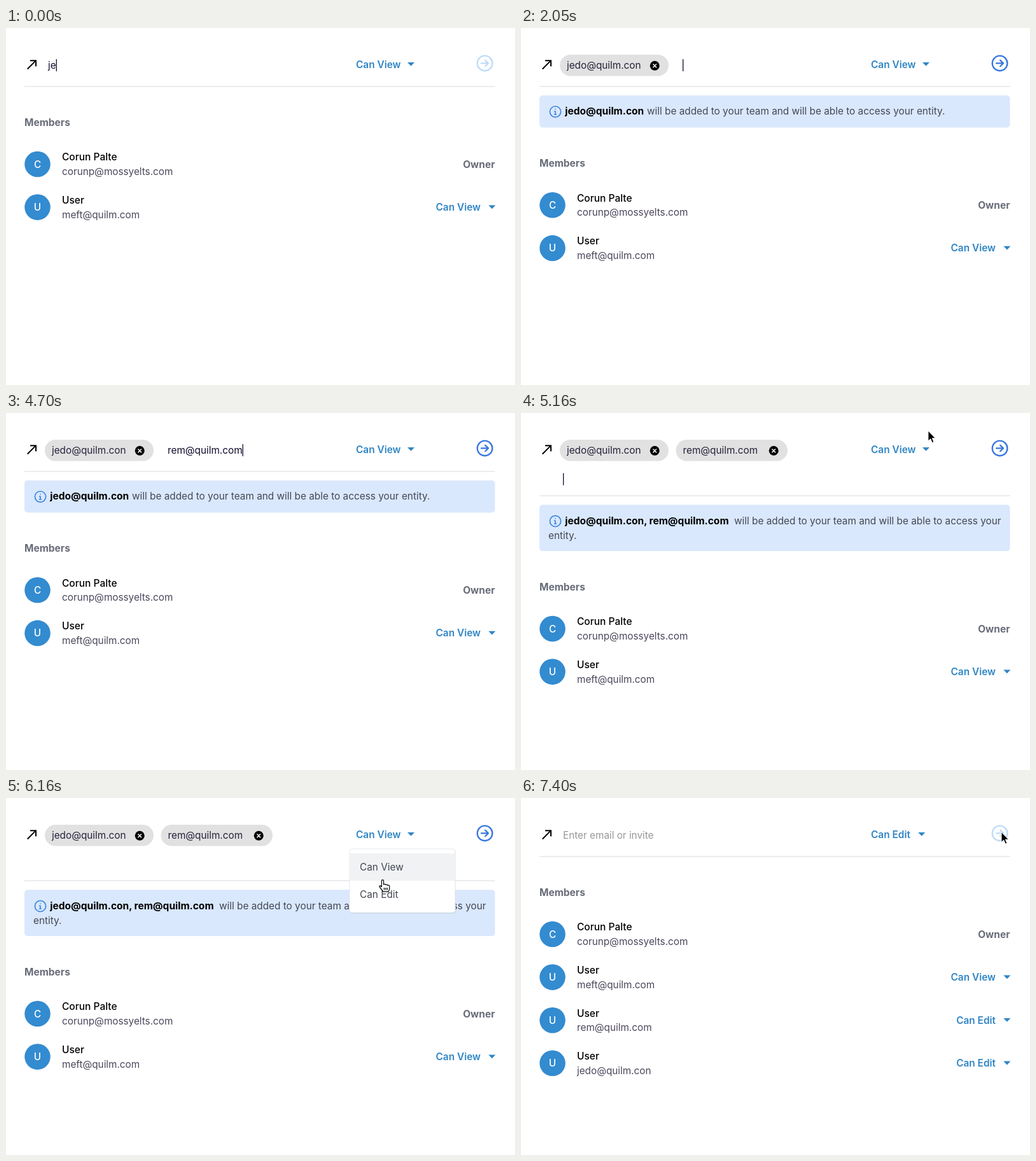
These frames come from a looping animation (800x561 px, 8000 ms). An HTML page:

```html
<!DOCTYPE html>
<html lang="en">
<head>
<meta charset="utf-8">
<title>Invite members</title>
<style>
  html, body { margin: 0; width: 100%; height: 100%; overflow: hidden; background: #fff; }
  svg { display: block; width: 800px; height: 561px; font: 15.3px Inter, sans-serif; }
  text { white-space: pre; }
  .input { fill: #110c2c; }
  .hint { fill: #97979b; }
  .chip { fill: #262138; }
  .name { font-size: 15.5px; font-weight: 500; fill: #000; }
  .mail { fill: #4c465c; }
  .head { font-size: 15.5px; font-weight: 700; fill: #686c79; }
  .role { font-size: 15.4px; font-weight: 600; fill: #2f85c5; }
  .note { font-size: 15.35px; fill: #434753; }
  .added { font-size: 15.5px; font-weight: 700; fill: #000; }
  .initial { font-weight: 500; fill: #fff; text-anchor: middle; }
  .end { text-anchor: end; }
  .line { fill: none; stroke-linecap: round; stroke-linejoin: round; }
</style>
</head>
<body>
<svg viewBox="0 0 800 561">
  <g id="page"></g>
  <rect id="caret" width="1.3" height="19" fill="#110c2c"/>
  <g id="menu">
    <rect x="541" y="81" width="166" height="101" rx="4" fill="#000" opacity=".06"/>
    <rect x="540" y="80" width="166" height="100" rx="4" fill="#fff" stroke="#e5e7eb"/>
    <rect id="hover" x="541" width="164" height="43" fill="#f1f2f4"/>
    <text class="note" x="556" y="114">Can View</text>
    <text class="note" x="556" y="157">Can Edit</text>
  </g>
  <g id="cursor">
    <path id="arrow" fill="#000" stroke="#fff" d="M0 0V16L3.7 12.6 6.3 18.6 8.9 17.5 6.4 11.7H11.4Z"/>
    <path id="hand" fill="#fff" stroke="#000" stroke-width="1.2" stroke-linejoin="round"
      d="M-1.5 11V1.2a1.6 1.6 0 0 1 3.2 0V7q2.6-1.6 3.4 .5 2.4-1 3 .8 2.8-.7 2.8 1.6v3.2q0 2-1.5 5H.8Q-1 15-4.2 11.5q-1.6-2 .3-2.6 1.2 0 2.4 2.1M2.6 12v3.5m2.4-3.5v3.5m2.4-3.5v3.5"/>
  </g>
</svg>
<script>
const LOOP = 8000;
const FIRST = 'jedo@quilm.con', SECOND = 'rem@quilm.com';
const MEMBERS = [['Corun Palte', 'corunp@mossyelts.com', 'Owner'], ['User', 'meft@quilm.com', 'Can View']];
const INVITED = [SECOND, FIRST].map(mail => ['User', mail, 'Can Edit']);

// Moment at which each character appears
const KEYS = {
  [FIRST]: [0, 0, 100, 250, 450, 650, 1000, 1150, 1250, 1400, 1550, 1650, 1800, 1900],
  [SECOND]: [2600, 2800, 3000, 3200, 3650, 3750, 3850, 4000, 4100, 4200, 4300, 4450, 4550]
};
const CHIP1 = 2050, CHIP2 = 4900, OPEN = 5850, PICK = 6450, SENT = 7250;
// Pointer stops: time, x, y
const PATH = [[5150, 640, 28], [5700, 581, 61.5], [5900, 581, 61.5], [6300, 596, 155],
  [6620, 596, 155], [7050, 755, 53.5], [LOOP, 755, 53.5]];

const $ = id => document.getElementById(id);
const clamp = v => Math.min(1, Math.max(0, v));
const text = (x, y, str, cls) => `<text x="${x}" y="${y}" class="${cls}">${str}</text>`;
const line = (d, color, width) => `<path class="line" d="${d}" stroke="${color}" stroke-width="${width}"/>`;
const caretDown = (x, y) => `<path fill="#2f85c5" d="M${x} ${y}h11l-5.5 5.8z"/>`;
const typed = (str, t) => str.slice(0, KEYS[str].filter(k => k <= t).length);

function chip(x, w, mail) {
  const cx = x + w - 21.8;
  return `<rect x="${x}" y="42" width="${w}" height="33.5" rx="16.75" fill="#e1e1e2"/>` +
    text(x + 11, 64, mail, 'chip') + `<circle cx="${cx}" cy="59.3" r="7.5"/>` +
    line(`M${cx - 2.3} 57l4.6 4.6m0-4.6l-4.6 4.6`, '#fff', 1.6);
}

function member([name, mail, role], y) {
  const owner = role === 'Owner';
  return `<circle cx="49.5" cy="${y}" r="20.3" fill="#338bd0"/>` +
    text(49.5, y + 5.5, name[0], 'initial') +
    text(88, y - 5.6, name, 'name') + text(88, y + 17, mail, 'mail') +
    (owner ? text(768.5, y + 5.5, role, 'head end')
      : text(746, y + 5.5, role, 'role end') + caretDown(758.4, y - 3.2));
}

function banner(chips) {
  const single = chips === 1, y = single ? 106 : 144.3;
  const who = single ? FIRST : `${FIRST}, ${SECOND}`;
  const rest = 'will be added to your team and will be able to access your';
  return `<rect x="29" y="${y}" width="739.5" height="${single ? 50.5 : 72.8}" rx="5" fill="#dae8fd"/>` +
    `<circle class="line" cx="54" cy="${y + 25.6}" r="8.6" stroke="#3a86df" stroke-width="1.7"/>` +
    line(`M54 ${y + 21.6}v.1m-1.3 3.4h1.3v4.6m-1.5 0h3`, '#3a86df', 1.6) +
    text(69.3, y + 30.2, who, 'added') +
    text(single ? 198 : 335, y + 30.2, single ? rest + ' entity.' : rest, 'note') +
    (single ? '' : text(43, y + 54, 'entity.', 'note'));
}

function page({ chips, value, role, sent }) {
  const shift = [0, 64.3, 125][chips];
  const rule = chips === 2 ? 130 : 91.8;
  const tone = chips ? '#3877df' : '#bddbf9';
  const rows = sent ? MEMBERS.concat(INVITED) : MEMBERS;
  return '<path d="M38 50.2v2h6.6L33 63.8l1.4 1.4L46 53.6v6.6h2v-10z"/>' +
    (chips > 0 ? chip(61, 171, FIRST) : '') + (chips > 1 ? chip(243.5, 175.5, SECOND) : '') +
    (sent ? text(66, 64, 'Enter email or invite', 'hint')
      : `<text id="input" class="input" x="${chips === 1 ? 254 : 66}" y="64">${value}</text>`) +
    text(550, 63, role, 'role') + caretDown(role === 'Can View' ? 631 : 624.2, 54) +
    `<circle class="line" cx="752.6" cy="55.4" r="11.8" stroke="${tone}" stroke-width="2.4"/>` +
    line('M747 55.4h11m-4.8-4.8l4.8 4.8-4.8 4.8', tone, 2.2) +
    `<rect x="29" y="${rule - .8}" width="739.5" height="1.6" fill="#e7e8eb"/>` +
    (chips ? banner(chips) : '') +
    text(29, 154 + shift, 'Members', 'head') +
    rows.map((row, i) => member(row, 214 + shift + i * 67.6)).join('');
}

function stateAt(t) {
  const sent = t >= SENT;
  const chips = sent || t < CHIP1 ? 0 : t < CHIP2 ? 1 : 2;
  const value = sent || chips === 2 ? '' : typed(chips ? SECOND : FIRST, t);
  return { chips, value, sent, role: t >= PICK ? 'Can Edit' : 'Can View', focus: t < OPEN };
}

function pointerAt(t) {
  const i = Math.max(1, PATH.findIndex(p => p[0] > t));
  const [t0, x0, y0] = PATH[i - 1], [t1, x1, y1] = PATH[i];
  const p = clamp((t - t0) / (t1 - t0)), e = p * p * (3 - 2 * p);
  return [x0 + (x1 - x0) * e, y0 + (y1 - y0) * e];
}

const show = (el, on) => el.setAttribute('visibility', on ? 'visible' : 'hidden');
let last = '';

function draw() {
  const t = performance.now() % LOOP;
  const state = stateAt(t), key = JSON.stringify(state);
  if (key !== last) {
    last = key;
    $('page').innerHTML = page(state);
    show($('caret'), state.focus);
    if (state.focus) {
      const x = state.chips === 1 ? 254 : 66;
      const width = state.value ? $('input').getComputedTextLength() : 0;
      $('caret').setAttribute('x', x + width);
      $('caret').setAttribute('y', state.chips === 2 ? 94.5 : 49);
    }
  }

  const [x, y] = pointerAt(t);
  const hand = t > 5550 && t < 6680 || t > 6980 && t < SENT;
  show($('cursor'), t >= PATH[0][0]);
  $('cursor').setAttribute('transform', `translate(${x} ${y})`);
  $('hand').style.display = hand ? '' : 'none';
  $('arrow').style.display = hand ? 'none' : '';

  const alpha = clamp((t - OPEN) / 150) * clamp((6620 - t) / 170);
  $('menu').setAttribute('opacity', alpha);
  $('hover').setAttribute('y', y < 130 ? 87 : 130);
  show($('hover'), y > 87);
  requestAnimationFrame(draw);
}
draw();
</script>
</body>
</html>
```
